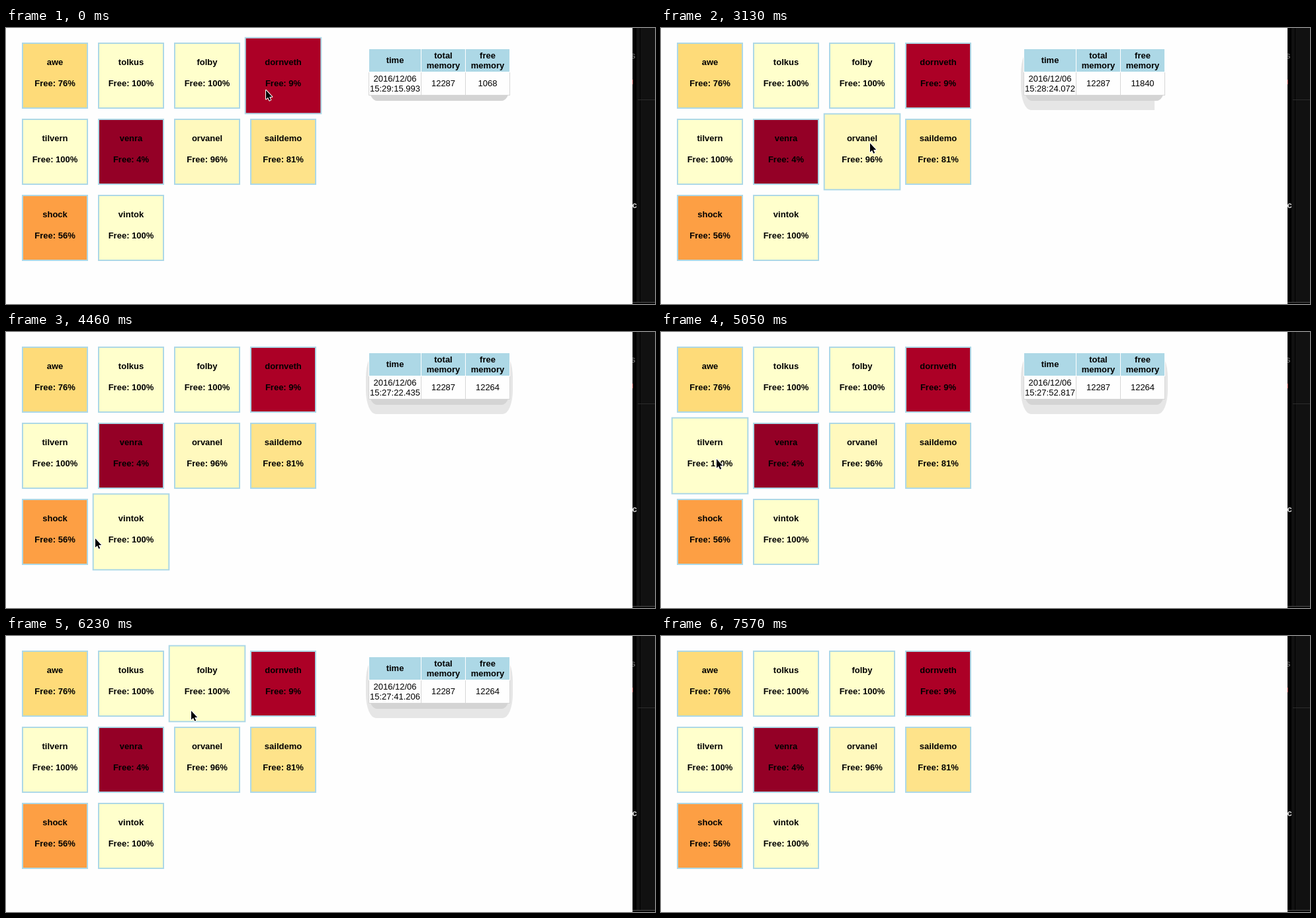
These frames come from a looping animation (981x417 px, 7990 ms). An HTML page with a canvas:

```html
<!DOCTYPE html>
<html lang="en">
<head>
<meta charset="utf-8">
<title>Free memory</title>
<style>
html, body { margin: 0; width: 100%; height: 100%; overflow: hidden; background: #fefefe; }
canvas { display: block; }
</style>
</head>
<body>
<canvas id="stage" width="981" height="417"></canvas>
<script>
const ctx = document.getElementById('stage').getContext('2d');
const LOOP = 7990, STEP = 148.4, PITCH = 115;
const FONT = '13px "Liberation Sans", Arial, sans-serif';
const BLUE = '#add8e6', PAPER = '#fefefe';

// colour ramp from all free to all used
const ramp = ['ffffcc', 'ffeda0', 'fed976', 'feb24c', 'fd8d3c', 'fc4e2a', 'e31a1c', 'bd0026', '800026'];

function heat(used) {
  const pos = used * (ramp.length - 1), i = Math.min(Math.floor(pos), ramp.length - 2);
  const [a, b] = [ramp[i], ramp[i + 1]].map(c => c.match(/../g).map(h => parseInt(h, 16)));
  return `rgb(${a.map((v, n) => Math.round(v + (b[n] - v) * (pos - i)))})`;
}

function host(name, clock, free, total = 12287) {
  const percent = Math.round(free / total * 100);
  return { name, clock, free, total, percent, fill: heat(1 - percent / 100) };
}

const hosts = [
  host('awe', '15:29:02.318', 9338),
  host('tolkus', '15:27:10.463', 12264),
  host('folby', '15:27:41.206', 12264),
  host('dornveth', '15:29:15.993', 1068),
  host('tilvern', '15:27:52.817', 12264),
  host('venra', '15:28:36.540', 491),
  host('orvanel', '15:28:24.072', 11840),
  host('saildemo', '15:29:44.291', 6562, 8105),
  host('shock', '15:28:13.725', 6880),
  host('vintok', '15:27:22.435', 12264)
];

// pointer strokes: each curves on from where the last one stopped
const origin = [393, 94];
const strokes = [
  { from: 0, to: 3, bend: [335, 100], end: [322, 96] },
  { from: 7, to: 14, bend: [342, 168], end: [315, 155] },
  { from: 20, to: 28, bend: [328, 230], end: [185, 310] },
  { from: 28, to: 36, bend: [69, 355], end: [82, 70] },
  { from: 36, to: 44, bend: [193, 34], end: [456, 224] },
  { from: 45, to: 47, bend: [640, 290], end: [768, 323] },
  { from: 48, to: 51, bend: [869, 382], end: [970, 441] }
];

function pointerAt(step) {
  let pos = origin;
  for (const { from, to, bend, end } of strokes) {
    if (step < from) break;
    const k = Math.min(1, (step - from) / (to - from)), j = 1 - k;
    pos = pos.map((p, n) => Math.round(j * j * p + 2 * j * k * bend[n] + k * k * end[n]));
  }
  return pos;
}

function hostAt(x, y) {
  const col = Math.floor((x - 16.5) / PITCH), row = Math.floor((y - 14.5) / PITCH);
  return col >= 0 && col < 4 && row >= 0 ? row * 4 + col : -1;
}

function rect(color, x, y, w, h) {
  ctx.fillStyle = color;
  ctx.fillRect(x, y, w, h);
}

function text(str, x, y, bold, color = '#000') {
  ctx.font = (bold ? 'bold ' : '') + FONT;
  ctx.textAlign = 'center';
  ctx.fillStyle = color;
  ctx.fillText(str, x, y);
}

function drawHost(i, active) {
  const { name, percent, fill } = hosts[i];
  const x = 74 + i % 4 * PITCH, y = 72 + Math.floor(i / 4) * PITCH;
  const r = active ? 58.3 : 50;
  rect(BLUE, x - r, y - r, r * 2, r * 2);
  rect(fill, x - r + 2, y - r + 2, r * 2 - 4, r * 2 - 4);
  text(name, x, y - 16, true);
  text(`Free: ${percent}%`, x, y + 16, true);
}

function shadow(color, x, y, w, h, rx, ry) {
  ctx.fillStyle = color;
  ctx.beginPath();
  ctx.roundRect(x, y, w, h, { x: rx, y: ry });
  ctx.fill();
}

function clipped(x, y, w, h, paint) {
  ctx.save();
  ctx.beginPath();
  ctx.rect(x, y, w, h);
  ctx.clip();
  paint();
  ctx.restore();
}

function drawColumn(x, w, mid, title, value) {
  rect(BLUE, x, 32, w, 34);
  rect(PAPER, x, 67, w, 34);
  lines(title, mid, 53.5);
  lines(value, mid, 88.5, false);
}

function lines(list, x, y, bold = true) {
  list.forEach((s, i) => text(s, x, Math.floor(y + (i - (list.length - 1) / 2) * 15), bold));
}

function drawTable({ clock, total, free }, step) {
  // the outer shadow grows in as the picture refreshes
  if (step > 0) {
    clipped(500, 0, step < 25 ? 246 : 300, 200, () => shadow('#e6e6e6', 544, 32, 222, 92, 15, 36));
  }
  shadow('#d4d4d4', 549, 40, 212, 70, 12, 20);
  rect('#d6d6d6', 548, 67, 214, 35);
  rect(PAPER, 548, 31, 214, 36);
  drawColumn(549, 78, 588, ['time'], ['2016/12/06', clock]);
  drawColumn(628, 66, 661, ['total', 'memory'], [total]);
  drawColumn(695, 66, 728, ['free', 'memory'], [free]);
}

function drawStrip() {
  clipped(947, 0, 34, 417, () => {
    rect('#000', 947, 0, 34, 417);
    rect('#111', 953, 0, 28, 414);
    rect('#000', 958, 0, 1, 414);
    rect('#2c2c2c', 955, 108, 26, 1);
    rect('#555', 947, 414, 34, 1);
    rect('#8c1a1a', 947, 78, 1, 7);
    text('s', 948, 46, false, '#8a8a8a');
    text('c', 950, 272, true, '#ddd');
  });
}

const arrow = new Path2D('M0 0V13.5L3 10.8L5.2 15.6L7.2 14.7L5.1 10H9.2Z');

function drawPointer(x, y) {
  ctx.save();
  ctx.translate(x, y);
  ctx.lineJoin = 'round';
  ctx.lineWidth = 2;
  ctx.strokeStyle = '#fff';
  ctx.stroke(arrow);
  ctx.fillStyle = '#000';
  ctx.fill(arrow);
  ctx.restore();
}

function draw(now) {
  const step = Math.floor(now % LOOP / STEP);
  const [x, y] = pointerAt(step);
  const active = hostAt(x, y);
  rect(PAPER, 0, 0, 981, 417);
  hosts.forEach((h, i) => { if (i !== active) drawHost(i, false); });
  if (hosts[active]) {
    drawHost(active, true);
    drawTable(hosts[active], step);
  }
  drawStrip();
  if (step < 51) drawPointer(x, y);
}

const start = performance.now();
function tick() {
  draw(performance.now() - start);
  requestAnimationFrame(tick);
}
tick();
</script>
</body>
</html>
```
